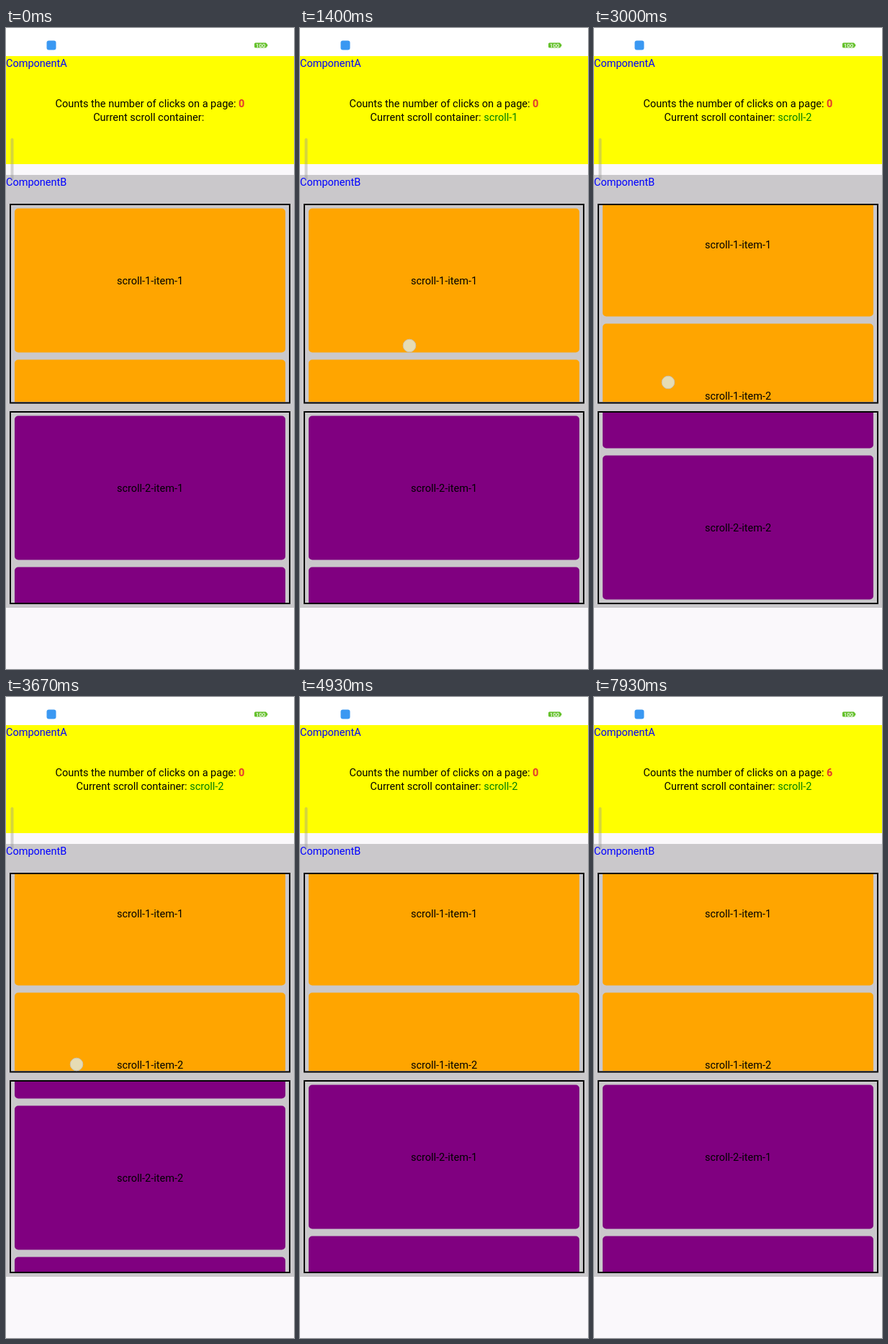
These frames come from a looping animation (400 by 890 pixels, 8000 ms). An HTML page:

```html
<!DOCTYPE html>
<html lang="en">
<head>
<meta charset="utf-8">
<title>Nested scroll demo</title>
<style>
  html, body { margin: 0; width: 100%; height: 100%; overflow: hidden; background: #faf8fb; }
  svg { display: block; width: 400px; height: 890px; }
  text { font: 14.5px Roboto, "Noto Sans", sans-serif; white-space: pre; }
  .mid { text-anchor: middle; }
  .title { fill: #00f; }
  .frame { fill: none; stroke: #000; stroke-width: 2; }
  #count { fill: #e23a2e; font-weight: 700; }
  #label { fill: #008000; }
  #dot { fill: #e6dcb4; stroke: #c9c2b4; stroke-width: 1; }
</style>
</head>
<body>
<svg viewBox="0 0 400 890">
  <defs>
    <clipPath id="clip1"><rect x="7" y="246" width="386" height="273"/></clipPath>
    <clipPath id="clip2"><rect x="7" y="534" width="386" height="264"/></clipPath>
  </defs>

  <rect width="400" height="39" fill="#fff"/>
  <rect x="56.5" y="17.5" width="13" height="13" rx="3" fill="#3a98f2"/>
  <rect x="345" y="20.5" width="17" height="7" rx="1.5" fill="#62c028"/>
  <rect x="362" y="22.5" width="1.3" height="3" fill="#62c028"/>
  <text class="mid" x="353.5" y="27" style="font-size:8px;font-weight:500" fill="#fff">100</text>

  <rect y="39" width="400" height="150" fill="#ff0"/>
  <text class="title" x="0" y="53.5">ComponentA</text>
  <text class="mid" x="200" y="110">Counts the number of clicks on a page: <tspan id="count">0</tspan></text>
  <text class="mid" x="200" y="129">Current scroll container: <tspan id="label"></tspan></text>

  <rect y="204" width="400" height="601" fill="#cac8cb"/>
  <text class="title" x="0" y="218.5">ComponentB</text>

  <g clip-path="url(#clip1)"><g id="list1"></g></g>
  <rect class="frame" x="6" y="245" width="388" height="275.5"/>
  <g clip-path="url(#clip2)"><g id="list2"></g></g>
  <rect class="frame" x="6" y="533" width="388" height="266"/>

  <rect x="6.5" y="153" width="4" height="58" rx="2" fill="#969696" fill-opacity=".4"/>
  <circle id="dot" r="8.8"/>
</svg>

<script>
const LOOP = 8000;
const $ = id => document.getElementById(id);

function fillList(n, top, color) {
  let html = '';
  for (let i = 0; i < 4; i++) {
    const y = top + i * 210;
    html += `<rect x="12" y="${y}" width="376" height="200" rx="5" fill="${color}"/>` +
      `<text class="mid" x="200" y="${y + 105}">scroll-${n}-item-${i + 1}</text>`;
  }
  $('list' + n).innerHTML = html;
}
fillList(1, 250.5, '#ffa500');
fillList(2, 538.5, '#800080');

// Drag points: time, finger x, finger y, scroll offset (clamped at 0)
const drag1 = [
  [770, 160, 405, 0], [1070, 146, 300, 105], [1400, 152, 441, -36],
  [1480, 153, 443, 0], [1800, 146, 323, 120], [2130, 150, 435, 8], [2400, 148, 393, 50]
];
const drag2 = [
  [2820, 112, 647, 0], [3000, 103, 492, 155], [3330, 106, 691, -44],
  [3330, 106, 691, 0], [3670, 98, 510, 181], [4070, 104, 696, -5], [4440, 106, 712, -21]
];

// Taps: press time, x, y
const taps = [
  [5080, 97, 452], [5470, 94, 449], [5920, 95, 446],
  [6260, 96, 447], [6980, 95, 449], [7380, 94, 447]
];
const PRESS = 150;

function sample(points, t) {
  const last = points[points.length - 1];
  if (t <= points[0][0]) return points[0];
  if (t >= last[0]) return last;
  const i = points.findIndex(p => p[0] > t);
  const a = points[i - 1], b = points[i];
  const k = (1 - Math.cos(Math.PI * (t - a[0]) / (b[0] - a[0]))) / 2;
  return a.map((v, j) => v + (b[j] - v) * k);
}

const within = (points, t) => t >= points[0][0] && t < points[points.length - 1][0];

function setText(id, text) {
  if ($(id).textContent !== text) $(id).textContent = text;
}

function draw(t) {
  let finger = taps.find(p => t >= p[0] && t < p[0] + PRESS);
  [drag1, drag2].forEach((points, i) => {
    const p = sample(points, t);
    $('list' + (i + 1)).setAttribute('transform', `translate(0 ${-Math.max(0, p[3])})`);
    if (within(points, t)) finger = p;
  });

  $('dot').style.display = finger ? '' : 'none';
  if (finger) {
    $('dot').setAttribute('cx', finger[1]);
    $('dot').setAttribute('cy', finger[2]);
  }

  setText('label', t < 830 ? '' : t < 2870 ? 'scroll-1' : 'scroll-2');
  setText('count', String(taps.filter(p => t >= p[0] + PRESS).length));
}

const start = performance.now();
function tick() {
  draw((performance.now() - start) % LOOP);
  requestAnimationFrame(tick);
}
tick();
</script>
</body>
</html>
```
